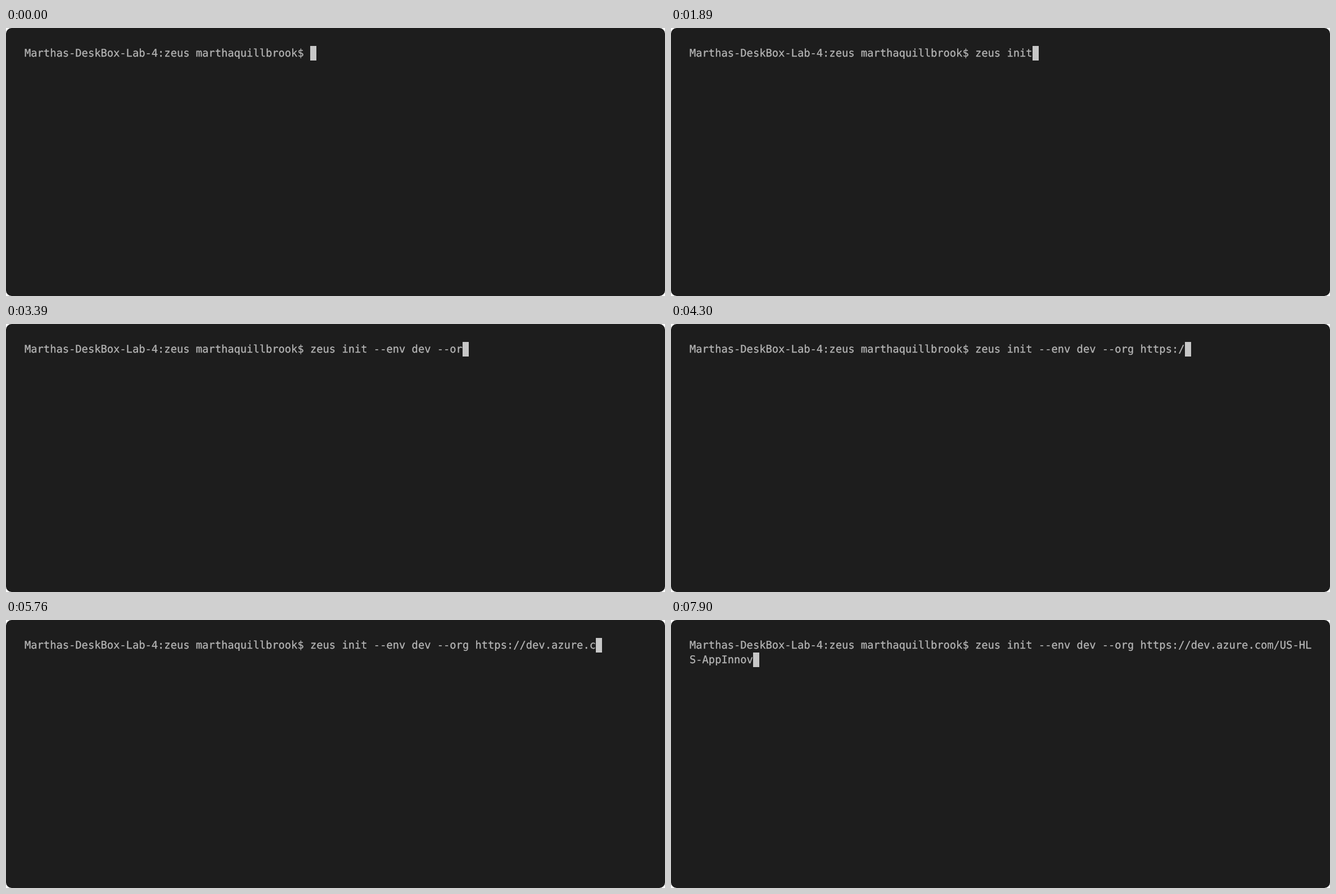
Recreate the animation shown at these times as an HTML page. Size 1172 by 478 pixels, loop 8 s.

```html
<!DOCTYPE html>
<html lang="en">
<head>
<meta charset="utf-8">
<title>Terminal</title>
<style>
  html, body { margin: 0; width: 100%; height: 100%; overflow: hidden; background: #fff; }
  #terminal {
    position: relative; width: 1172px; height: 478px;
    border-radius: 10px; background: #1d1d1d; overflow: hidden;
  }
  #screen {
    position: absolute; left: 33px; top: 33px; margin: 0;
    font: 18.75px/26px "DejaVu Sans Mono", monospace;
    font-variant-ligatures: none; text-rendering: geometricPrecision;
    color: #b4b4b4; -webkit-text-stroke: .3px #b4b4b4;
  }
  #cursor { position: absolute; width: 11.29px; height: 26px; background: #c7c7c7; }
</style>
</head>
<body>
<div id="terminal"><pre id="screen"></pre><div id="cursor"></div></div>
<script>
const LOOP = 8000, COLS = 98, CELL = 11.29, ROW = 26, LEFT = 33, TOP = 32;
const PROMPT = "Marthas-DeskBox-Lab-4:zeus marthaquillbrook$ ";
const COMMAND = "zeus init --env dev --org https://dev.azure.com/US-HLS-AppInnov";

// Steady typing between pauses: times and the characters typed by then
const BURSTS = [
  { start: 1000, end: 2810, from: 1, to: 19 },
  { start: 2990, end: 4680, from: 20, to: 37 },
  { start: 4830, end: 5370, from: 38, to: 43 },
  { start: 5610, end: 6680, from: 44, to: 52 },
  { start: 6870, end: 7900, from: 54, to: 63 }
];

function typedAt(time) {
  const burst = BURSTS.findLast(b => b.start <= time);
  if (!burst) return 0;
  const { start, end, from, to } = burst;
  const progress = Math.min(1, (time - start) / (end - start));
  return Math.floor(from + (to - from) * progress);
}

const screenText = document.getElementById("screen");
const cursor = document.getElementById("cursor");

function draw(time) {
  const text = PROMPT + COMMAND.slice(0, typedAt(time));
  screenText.textContent = text.slice(0, COLS) + "\n" + text.slice(COLS);
  cursor.style.left = LEFT + text.length % COLS * CELL + "px";
  cursor.style.top = TOP + Math.floor(text.length / COLS) * ROW + "px";
}

const origin = performance.now();
function tick() {
  draw((performance.now() - origin) % LOOP);
  requestAnimationFrame(tick);
}
tick();
</script>
</body>
</html>
```
